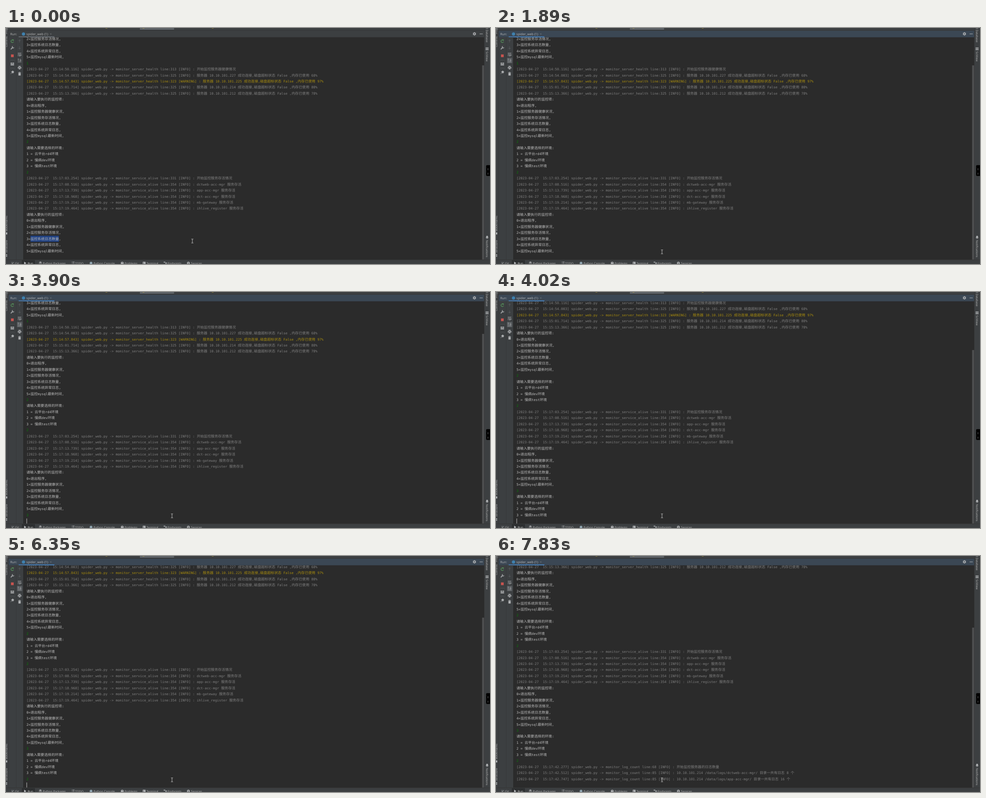
Animation of 1070x524 px, one loop 8 s. Source, as an HTML page with a canvas:

```html
<!DOCTYPE html>
<html lang="zh-CN">
<head>
<meta charset="utf-8">
<title>Run console</title>
<style>
html, body { margin: 0; width: 100%; height: 100%; overflow: hidden; background: #2b2b2b; }
canvas { display: block; }
</style>
</head>
<body>
<canvas id="stage" width="1070" height="524"></canvas>
<script>
const ctx = document.getElementById('stage').getContext('2d');
const LOOP = 8000, SCALE = 0.5605, LINE = 24 * SCALE, COL = 8 * SCALE;
const LEFT = 45.2, TOP = 20.5, BOTTOM = 514.5, FIRST = 24, PROMPT_ROW = 36;
const PANEL = '#3c3f41', EDGE = '#323232', ICON = '#afb1b3', DIM = '#5d6062', TEXT = '#bbbbbb';
const MONO = '13.29px "DejaVu Sans Mono", monospace';
const CJK = '14px "Noto Sans CJK SC", "Noto Sans CJK", sans-serif';

// Console contents
const plain = text => ({ text, color: TEXT });
const input = text => ({ text, color: '#087f08' });
const log = (time, source, message, level = 'INFO') => ({
  text: `[2023-04-27  ${time}] spider_web.py -> ${source} [${level}] : ${message}`,
  color: level === 'INFO' ? '#808080' : '#a98d0e'
});
const health = (time, host, used, line = 325, level) =>
  log(time, `monitor_server_health line:${line}`,
    `服务器 10.10.101.${host} 成功连接,磁盘超标状态 False ,内存已使用 ${used}%`, level);
const alive = (time, name) => log(time, 'monitor_service_alive line:354', `${name} 服务存活`);
const count = (time, name, n) =>
  log(time, 'monitor_log_count line:85', `10.10.101.214 /data/logs/${name}/ 目录一共有日志 ${n} 个`);
const menu = ['请输入要执行的监控项:', '0=退出程序,', '1=监控服务器健康状况,', '2=监控服务存活情况,',
  '3=监控系统日志数量,', '4=监控系统异常日志,', '5=监控mysql最新时间,'].map(plain);
const environments = ['请输入需要选择的环境:', '1 = 云平台rd4环境', '2 = 慢病dev环境',
  '3 = 慢病test环境'].map(plain);

const lines = [
  ...menu.slice(3), input('1'),
  log('15:14:50.116', 'monitor_server_health line:313', '开始监控服务器健康情况'),
  health('15:14:54.003', 227, 68),
  health('15:14:57.843', 225, 97, 323, 'WARNING'),
  health('15:15:01.714', 214, 88),
  health('15:15:13.366', 212, 78),
  ...menu, input('2'), ...environments, input('2'),
  log('15:17:03.254', 'monitor_service_alive line:331', '开始监控服务存活情况'),
  alive('15:17:08.516', 'dctweb-acc-mgr'),
  alive('15:17:13.739', 'app-acc-mgr'),
  alive('15:17:18.968', 'dct-acc-mgr'),
  alive('15:17:19.214', 'mb-gateway'),
  alive('15:17:19.464', 'ihlive_register'),
  ...menu, input('3'), ...environments, input('2'),
  log('15:17:42.277', 'monitor_log_count line:68', '开始监控服务器的日志数量'),
  count('15:17:42.512', 'dctweb-acc-mgr', 8),
  count('15:17:42.747', 'app-acc-mgr', 16)
];

// Timelines: [start, value...]
const scrolls = [[0, 0], [3900, 1], [4020, 5], [6350, 6], [6620, 7], [6900, 8], [7020, 9]];
const carets = [[0, null], [950, 'click'], [1220, 0], [1890, null], [2320, 0], [2470, 1], [3310, null],
  [3900, 0], [4830, null], [5270, 1], [5950, null], [6350, 0], [7830, null]];
const pointer = [[0, 412, 473], [120, 408, 473.5], [270, 390, 480.5], [420, 383, 487],
  [1220, 381, 489], [1340, 378, 492], [1460, 374, 495], [1610, 367, 497]];
const at = (track, t) => track.findLast(step => step[0] <= t);

// Drawing helpers
function rect(x, y, w, h, color) {
  ctx.fillStyle = color;
  ctx.fillRect(x, y, w, h);
}
function stroke(x, y, d, color = ICON, width = 1) {
  ctx.save();
  ctx.translate(x, y);
  ctx.strokeStyle = color;
  ctx.lineWidth = width;
  ctx.stroke(new Path2D(d));
  ctx.restore();
}
function fill(x, y, d, color = ICON) {
  ctx.save();
  ctx.translate(x, y);
  ctx.fillStyle = color;
  ctx.fill(new Path2D(d), 'evenodd');
  ctx.restore();
}
function dot(x, y, r, color = ICON) {
  ctx.fillStyle = color;
  ctx.beginPath();
  ctx.arc(x, y, r, 0, 7);
  ctx.fill();
}
function roundRect(x, y, w, h, r, color) {
  ctx.fillStyle = color;
  ctx.beginPath();
  ctx.roundRect(x, y, w, h, r);
  ctx.fill();
}
function label(text, x, y, { size = 11.5, color = TEXT, turn = 0 } = {}) {
  ctx.save();
  ctx.translate(x, y);
  ctx.rotate(turn * Math.PI / 2);
  ctx.scale(SCALE, SCALE);
  ctx.font = `${size}px "Open Sans", sans-serif`;
  ctx.textRendering = 'geometricPrecision';
  ctx.fillStyle = color;
  ctx.fillText(text, 0, 0);
  ctx.restore();
}
function consoleText({ text, color }, y) {
  ctx.save();
  ctx.translate(LEFT, y);
  ctx.scale(SCALE, SCALE);
  ctx.textRendering = 'geometricPrecision';
  ctx.fillStyle = color;
  let x = 0;
  for (const run of text.match(/[\u4e00-\u9fff]+|[^\u4e00-\u9fff]+/g)) {
    ctx.font = run > '\u4e00' ? CJK : MONO;
    ctx.fillText(run, x, 0);
    x += ctx.measureText(run).width;
  }
  ctx.restore();
}

function drawConsole(t) {
  const scroll = at(scrolls, t)[1];
  const typed = (t >= 2470 && t < 3900) || (t >= 5270 && t < 6350);
  const rowY = row => FIRST + (row - scroll) * LINE;

  rect(38, TOP, 1019, BOTTOM - TOP, '#2b2b2b');
  ctx.save();
  ctx.beginPath();
  ctx.rect(38, TOP, 1019, BOTTOM - TOP);
  ctx.clip();
  if (t < 950) rect(LEFT + 2 * COL, rowY(33) - 6.7, 8 * 14 * SCALE, LINE, '#214283');
  lines.slice(0, PROMPT_ROW + scroll + typed).forEach((line, row) => {
    if (row >= scroll) consoleText(line, rowY(row) + 2.8);
  });

  const caret = at(carets, t)[1];
  const drawCaret = (x, row) => rect(x + 0.1, rowY(row) - 5.4, 1.1, 11.2, TEXT);
  if (caret === 'click') drawCaret(LEFT + 3 * COL + 8 * 14 * SCALE, 34);
  else if (caret !== null) drawCaret(LEFT + caret * COL, PROMPT_ROW + scroll);

  const view = BOTTOM - TOP, thumb = view * view / ((42.04 + scroll) * LINE);
  rect(1052.5, BOTTOM - thumb, 4.5, thumb, '#4d4e4f');
  ctx.restore();
}

function drawHeader(focused) {
  const background = focused ? '#3b4754' : PANEL;
  rect(6, 6, 1051, TOP - 6, background);
  rect(28, 18.8, 79, 1.7, focused ? '#4a88c7' : '#747a80');
  label('Run:', 9.5, 15.6, { size: 12.3 });
  dot(38.7, 13.3, 3.6, '#3f80ad');
  label('spider_web (1)', 45, 15.6, { size: 12.7 });
  stroke(99, 13.3, 'M-1.6-1.6L1.6 1.6M1.6-1.6L-1.6 1.6', '#777b7e', 0.7);
  dot(1035.6, 13, 2.9);
  stroke(1035.6, 13, 'M0-3.8V3.8M-3.3-1.9L3.3 1.9M-3.3 1.9L3.3-1.9', ICON, 1.3);
  dot(1035.6, 13, 1.2, background);
  rect(1047, 12.6, 7, 1, ICON);
}

function drawTools(followEnd) {
  rect(6, TOP, 32, BOTTOM - TOP, PANEL);
  rect(22, TOP, 0.6, BOTTOM - TOP, EDGE);
  rect(9, 71.5, 11, 0.6, '#515456');
  rect(9, 89, 11, 0.6, '#515456');

  stroke(14, 29, 'M2.8 1.4A3 3 0 1 1 1.6-2.2', '#59a05e', 1.1);
  fill(14, 29, 'M.6-4.2L4-2L.8-.4Z', '#59a05e');
  stroke(14, 44, 'M-3.4 3.4L1 -1', ICON, 1.7);
  stroke(14, 44, 'M1.2-3.4A2 2 0 1 0 3.5-1', ICON, 1.2);
  rect(11, 58.7, 6, 6, '#c75450');
  fill(14, 80, 'M-3.8-3H-.4V-.4H-3.8ZM.4-3H3.8V-.4H.4ZM-3.8.5H3.8V3H-3.8Z');
  stroke(14, 98.5, 'M-3.6 3.6L-.6.6M-2.6-1.6L1.6 2.6', ICON, 0.9);
  fill(14, 98.5, 'M1-4L4-1L1.4 2.2L-2.2-1.4Z');

  stroke(30, 29, 'M0 3V-2.8M-2.3-.6L0-2.9L2.3-.6', DIM, 0.9);
  stroke(30, 44, 'M0-3V2.8M-2.3.6L0 2.9L2.3.6', DIM, 0.9);
  stroke(30, 58.5, 'M-4-2.6H4M-4 .2H2.3A1.4 1.4 0 0 1 2.3 3H.2M-4 3H-2');
  fill(30, 58.5, 'M.8 1.2V4.8L-1.4 3Z');
  if (followEnd) roundRect(24, 66, 12.2, 12.2, 1.5, '#54585b');
  stroke(30, 72, 'M-4 3.2H4M-4-3H-1M-4-.4H-1M2-3.6V1M0-.8L2 1.3L4-.8', ICON, 0.9);
  fill(30, 88, 'M-2.4-3.8H2.4V-1.9H-2.4ZM-3.9-1.3H3.9V2H2.5V.6H-2.5V2H-3.9ZM-1.8 1.2H1.8V3.7H-1.8Z');
  fill(30, 101.7, 'M-3-3.2H-1.1V-3.9H1.1V-3.2H3V-2.2H-3ZM-2.5-1.6H2.5V3.8H-2.5Z');
}

function drawStripes() {
  // Editor tab remnants
  rect(0, 0, 1070, 6, PANEL);
  rect(296, 0, 75.5, 1.4, '#4e5254');
  rect(296, 1.4, 75.5, 1.8, '#747a80');
  for (const x of [220, 302, 455]) rect(x, 0, 4, 0.8, '#9c8a3c');
  rect(0, 5.4, 1070, 0.6, EDGE);

  // Left stripe
  rect(0, 0, 6, 524, PANEL);
  rect(5.6, 0, 0.6, BOTTOM, EDGE);
  for (const [text, y] of [['Project', 13], ['Commit', 42], ['Bookmarks', 451], ['Structure', 499]])
    label(text, 3.4, y, { turn: -1 });
  rect(0, 453.8, 2.8, 4.6, ICON);
  rect(0, 502.5, 2.6, 2, ICON);
  rect(0, 505.6, 2.6, 2, ICON);

  // Right stripe
  rect(1057, 0, 13, 524, PANEL);
  rect(1057, 0, 0.6, BOTTOM, EDGE);
  for (const [text, y] of [['Database', 3.5], ['SciView', 52], ['Notifications', 471]])
    label(text, 1061, y, { turn: 1 });
  rect(1061, 0, 5, 0.8, ICON);
  fill(1063.5, 46.2, 'M-3-3H-.3V-.5H-3ZM.4-3H3V-.5H.4ZM-3 .4H-.3V3H-3ZM.4 .4H3V3H.4Z');
  fill(1063.6, 464.5, 'M-3.2 2L-2.2 .6V-1A2.2 2.2 0 0 1 2.2-1V.6L3.2 2ZM-1 2.6H1V3.6H-1Z');
  roundRect(1061.4, 304.5, 10, 24, 2, '#000');
  stroke(1065.5, 314, 'M0-2V2M-1-1L0-2L1-1', '#8c8c8c', 0.6);
  stroke(1065.5, 323, 'M0-2V2M-1 1L0 2L1 1', '#8c8c8c', 0.6);
}

function drawBottomBar() {
  rect(0, BOTTOM, 1070, 524 - BOTTOM, PANEL);
  rect(0, BOTTOM, 1070, 0.7, EDGE);
  rect(35, 515.4, 29, 9, '#2d2f30');
  const items = [['Git', 20], ['Run', 48], ['Python Packages', 81.5], ['TODO', 153], ['Python Console', 193.5],
    ['Problems', 262], ['Terminal', 310.5], ['Endpoints', 357.5], ['Services', 409]];
  for (const [text, x] of items) label(text, x, 524.6, { color: text === 'Run' ? '#e0e0e0' : TEXT });

  stroke(15, 522, 'M-1.6-2.6V3M1.8-2.4V-.6L-1.6 1.4', ICON, 0.8);
  fill(42.4, 522, 'M-2.4-3.2L2.8 0L-2.4 3.2Z');
  fill(76, 522, 'M-3.4-1.7L0-3.4L3.4-1.7L0 0Z');
  stroke(76, 522, 'M-3.4 .2L0 1.9L3.4 .2', ICON, 0.9);
  stroke(148.3, 522, 'M-3-2.6H-2M-1.1-2.6H3.2M-3 0H-2M-1.1 0H3.2M-3 2.6H-2M-1.1 2.6H3.2', ICON, 1);
  dot(188, 522, 3, '#8fa3ae');
  dot(257, 522, 3.1);
  rect(256.6, 520, 0.9, 2.4, PANEL);
  rect(302.3, 519, 6.2, 6, ICON);
  stroke(305, 522, 'M-1.6-1.6L0 0L-1.6 1.6', PANEL, 0.9);
  stroke(352.5, 522, 'M-3-2.2H0V2.2M0 0H3', ICON, 0.9);
  dot(349.8, 519.9, 1.2);
  dot(355, 522, 1.2);
  dot(403.2, 522, 3.1);
  fill(403.2, 522, 'M-.9-1.6L1.7 0L-.9 1.6Z', PANEL);
}

function draw(t) {
  drawConsole(t);
  drawStripes();
  drawHeader(t >= 950);
  drawTools(t >= 1220);
  drawBottomBar();
  const [, x, y] = at(pointer, t);
  stroke(x, y, 'M-2.2-4.4H-.6L0-3.9L.6-4.4H2.2M0-3.9V3.9M-2.2 4.4H-.6L0 3.9L.6 4.4H2.2', '#d4d4d4', 0.9);
}

const start = performance.now();
function tick() {
  draw((performance.now() - start) % LOOP);
  requestAnimationFrame(tick);
}
tick();
</script>
</body>
</html>
```
